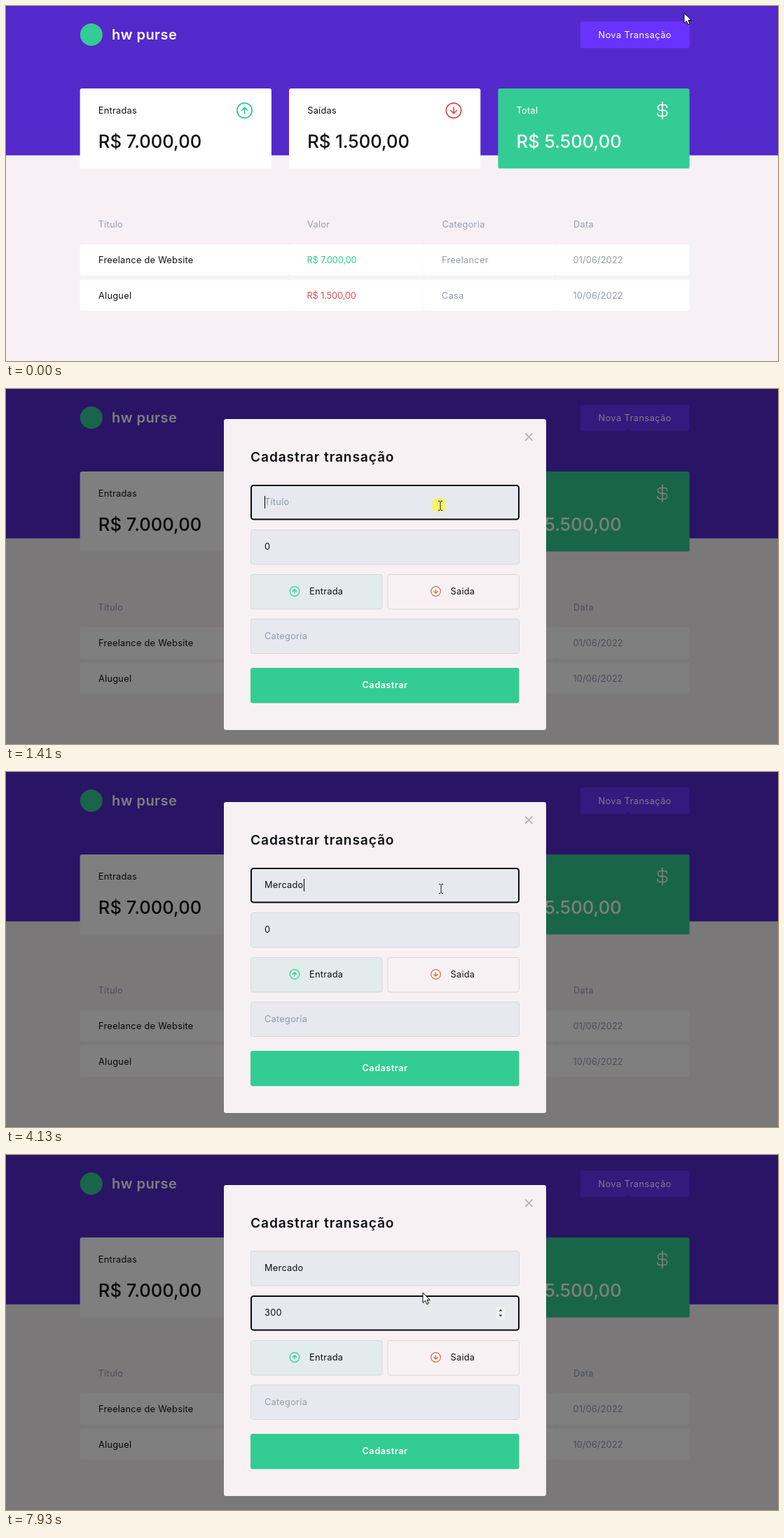
Write an HTML page that moves like this. It is 1102 px wide and 508 px high and loops after 8 s.

```html
<!DOCTYPE html>
<html lang="pt-BR">
<head>
<meta charset="utf-8">
<style>
  html, body { margin: 0; width: 100%; height: 100%; overflow: hidden; background: #f7f1f5; }
  svg { display: block; }
  text { font: 400 12.8px Inter, sans-serif; letter-spacing: .02em; white-space: pre; }
  .strong { font-weight: 600; letter-spacing: .035em; }
  .heading { font-size: 19.2px; letter-spacing: .045em; }
  .brand { font-size: 20px; letter-spacing: .023em; }
  .total { font-size: 25.6px; font-weight: 500; letter-spacing: 0; }
  .money { letter-spacing: -.01em; }
  .date { letter-spacing: .01em; }
  .line { fill: none; stroke-linecap: round; stroke-linejoin: round; }
</style>
</head>
<body>
<svg id="stage" width="1102" height="508" viewBox="0 0 1102 508"></svg>
<script>
const GREEN = '#33cc95', RED = '#d9524f', INK = '#101014', MUTED = '#969cb3', FIELD = '#e7e9ee';

const text = (x, y, content, fill = INK, attrs = '') =>
  `<text x="${x}" y="${y}" fill="${fill}" ${attrs}>${content}</text>`;
const box = (x, y, w, h, fill, attrs = '') =>
  `<rect x="${x}" y="${y}" width="${w}" height="${h}" rx="3.2" fill="${fill}" ${attrs}/>`;
const field = (x, y, w, fill) => box(x + .5, y + .5, w - 1, 49.5, fill, 'stroke="#d5d7dc"');
const arrowIcon = (x, y, size, color, width, down) =>
  `<g class="line" transform="translate(${x} ${y}) scale(${size} ${down ? -size : size})" stroke="${color}" stroke-width="${width / size}">
    <circle r="10"/><path d="M0 4V-4M-4 0L0-4L4 0"/></g>`;

function card(x, label, amount, icon, fill = '#fff', color = INK) {
  return box(x, 118, 273.3, 114.6, fill) + text(x + 26.2, 154, label, color) +
    text(x + 26.2, 203, amount, color, 'class="total"') + icon;
}

const columns = [105.6, 404, 596.5, 784, 975.7];
function row(y, title, amount, color, category, date) {
  const cells = columns.slice(0, 4).map((x, i) => box(x, y, columns[i + 1] - x, 44.5, '#fff')).join('');
  return cells + text(132, y + 27, title) + text(429.5, y + 27, amount, color, 'class="money"') +
    text(622, y + 27, category, MUTED) + text(809.5, y + 27, date, MUTED, 'class="date"');
}

const dollar = `<path class="line" stroke="#fff" stroke-width="1.7" d="M937 137.5v24M943.5 145
  q0-3.5-3.5-3.5h-5.5a3.9 3.9 0 0 0 0 7.8h5a4.1 4.1 0 0 1 0 8.2h-5.5q-4 0-4-4"/>`;

const page = `
  <rect width="1102" height="508" fill="#f7f1f5"/>
  <rect width="1102" height="213.7" fill="#5429cc"/>
  <circle cx="121.8" cy="41" r="16" fill="${GREEN}"/>
  ${text(151, 47.5, 'hw purse', '#fff', 'class="strong brand"')}
  <g id="newButton">${box(819.7, 22.2, 156, 38, '#6933ff')}
    ${text(897.7, 45.5, 'Nova Transação', '#fff', 'text-anchor="middle" style="letter-spacing:.035em"')}</g>
  ${card(105.6, 'Entradas', 'R$ 7.000,00', arrowIcon(340.5, 149.5, 1.07, GREEN, 1.7))}
  ${card(404, 'Saídas', 'R$ 1.500,00', arrowIcon(639, 149.5, 1.07, RED, 1.7, true))}
  ${card(702.4, 'Total', 'R$ 5.500,00', dollar, GREEN, '#fff')}
  ${['Título', 'Valor', 'Categoria', 'Data'].map((s, i) => text(columns[i] + 26, 316.5, s, MUTED)).join('')}
  ${row(341, 'Freelance de Website', 'R$ 7.000,00', GREEN, 'Freelancer', '01/06/2022')}
  ${row(391.5, 'Aluguel', 'R$ 1.500,00', RED, 'Casa', '10/06/2022')}`;

const modal = `<g id="modal">
  <rect width="1102" height="508" fill="#000" opacity=".5"/>
  <path id="notch" fill="#2a1466" d="M887 56.5l4.5 4h-8z"/>
  ${box(311, 43, 460, 445, '#f8f1f4')}
  <path class="line" stroke="#a9a9b0" stroke-width="1.6" d="M741.5 64l9.5 9.5m0-9.5l-9.5 9.5"/>
  ${text(349, 103.5, 'Cadastrar transação', INK, 'class="strong heading"')}
  ${field(349, 137, 384, FIELD)}${field(349, 201, 384, FIELD)}
  ${field(349, 265, 188.5, '#e2ecea')}${field(544.5, 265, 188.5, '#f8f1f4')}
  ${field(349, 328.5, 384, FIELD)}
  ${arrowIcon(412, 289.5, .68, GREEN, 1.2)}${text(433, 294, 'Entrada')}
  ${arrowIcon(613.5, 289.5, .68, '#cc7044', 1.2, true)}${text(634.5, 294, 'Saida')}
  ${box(349, 399, 383.5, 50.5, GREEN)}
  ${text(541, 428, 'Cadastrar', '#fff', 'class="strong" text-anchor="middle"')}
  <rect id="focus" x="350" width="382" height="48.5" rx="3.5" fill="none" stroke="#0c0c10" stroke-width="2"/>
  <rect id="selection" x="369" y="217" width="9" height="18" fill="#3390ff"/>
  ${text(369, 166, '', INK, 'id="title"')}${text(369, 230, '', INK, 'id="amount"')}
  ${text(369, 358, 'Categoria', INK, 'id="category"')}
  <g id="spinner"><rect x="700" y="217" width="12" height="18" fill="#f1f1f2"/>
    <path fill="#444" d="M703.5 223.5h5l-2.5-3zM703.5 228.5h5l-2.5 3z"/></g>
  <rect id="caret" width="1" height="18" fill="#000"/>
</g>`;

const pointers = `
  <circle id="click" r="10.5" fill="#ff0" opacity=".56"/>
  <path id="arrow" fill="#fff" stroke="#000" d="M0 0V14.5L3.4 11.4L5.8 16.6L8.2 15.5L5.9 10.5H10.2Z"/>
  <path id="hand" fill="#fff" stroke="#222" stroke-width=".9" d="M-1.5 1q1.5-2 3 0V7q1.5-1 3 .4
    q1.5-.8 2.8.6q2.5-.6 2.7 2V14l-1.5 5H0L-5 11.5q0-2.5 3.5-.5Z"/>
  <g id="beam" fill="none"><path stroke="#fff" stroke-width="2.4" opacity=".6" d="M0-6V6"/>
    <path stroke="#111" d="M-3-6.5H-1L0-5.5L1-6.5H3M-3 6.5H-1L0 5.5L1 6.5H3M0-5.5V5.5"/></g>`;

document.getElementById('stage').innerHTML = page + modal + pointers;
const el = id => document.getElementById(id);
const show = (id, on) => el(id).style.display = on ? '' : 'none';

// [time, pointer, x, y]
const pointerSteps = [
  [0, 'arrow', 968, 10], [100, 'arrow', 962, 14], [200, 'hand', 944, 27], [300, 'hand', 923, 41],
  [400, 'hand', 922, 42], [490, 'arrow', 922, 42], [590, 'arrow', 887, 57], [690, 'arrow', 812, 83],
  [790, 'arrow', 744, 107], [890, 'arrow', 690, 126], [990, 'beam', 646, 153], [1100, 'beam', 626, 165],
  [1210, 'beam', 620, 167], [1710, 'beam', 621, 167], [7730, 'beam', 621, 168], [7930, 'arrow', 595, 197]];
const titleKeys = [2310, 2510, 2810, 3330, 3430, 3630, 4130];
const amountKeys = [6830, 7030, 7130];
const typed = (word, keys, t) => word.slice(0, keys.filter(k => t >= k).length);
const within = (t, from, to) => t >= from && t < to;

function draw(t) {
  const [, kind, x, y] = pointerSteps.filter(s => t >= s[0]).pop();
  for (const id of ['arrow', 'hand', 'beam']) show(id, id === kind);
  el(kind).setAttribute('transform', `translate(${x} ${y})`);
  const pageClick = within(t, 400, 490);
  show('click', pageClick || within(t, 1410, 1510));
  el('click').setAttribute('transform', pageClick ? 'translate(921 41.5)' : 'translate(618 166)');

  el('newButton').style.filter = within(t, 200, 590) ? 'brightness(.9)' : 'none';
  show('modal', t >= 490);
  show('notch', t >= 690);

  const title = el('title'), amount = el('amount'), onAmount = t >= 5140;
  const name = typed('Mercado', titleKeys, t);
  const selected = within(t, 5140, 6830);
  const hint = t < 6830 ? '#869aad' : '#9a9ea9';
  title.textContent = name || 'Título';
  title.setAttribute('fill', name ? INK : hint);
  amount.textContent = typed('300', amountKeys, t) || '0';
  amount.setAttribute('fill', selected ? '#fff' : INK);
  el('category').setAttribute('fill', hint);
  show('selection', selected);
  show('spinner', onAmount);
  show('focus', t >= 1410);
  el('focus').setAttribute('y', onAmount ? 202 : 138);

  const caret = el('caret'), input = onAmount ? amount : title;
  show('caret', within(t, 1410, 1910) || within(t, 2310, 4620) || within(t, 6830, 7730));
  const length = onAmount || name ? input.getComputedTextLength() : 0;
  caret.setAttribute('x', 369 + Math.round(length));
  caret.setAttribute('y', onAmount ? 217 : 153);
}

function tick() {
  draw(performance.now() % 8000);
  requestAnimationFrame(tick);
}
tick();
</script>
</body>
</html>
```
